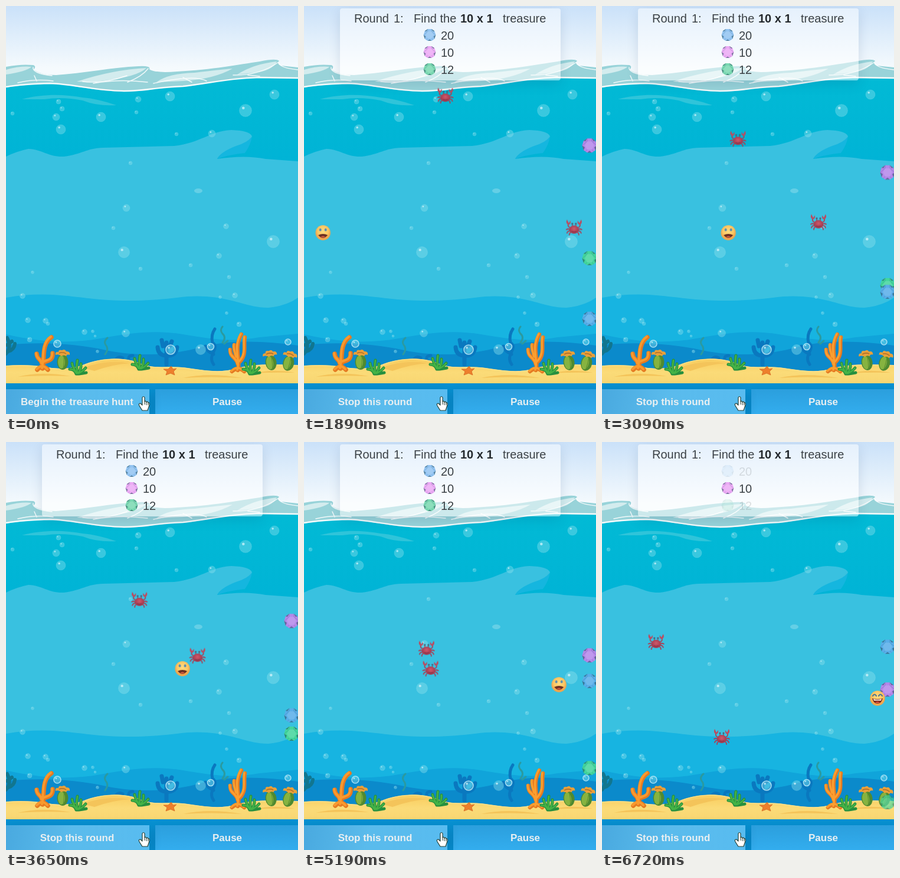
Write an HTML page that moves like this. It is 495 px wide and 691 px high and loops after 8 s.

```html
<!DOCTYPE html>
<html lang="en">
<head>
<meta charset="utf-8">
<title>Treasure hunt</title>
<style>
  html, body { margin: 0; width: 100%; height: 100%; overflow: hidden; }
  body { position: relative; background: #0791d2; font-family: "Liberation Sans", Arial, sans-serif; }
  svg { position: absolute; left: 0; top: 0; }
  .button {
    position: absolute; top: 649px; height: 42px; box-sizing: border-box;
    font: bold 17px/43px "Liberation Sans", Arial, sans-serif; color: #e9eff1; text-align: center;
  }
  #round { left: 0; width: 243px; padding-right: 2px; background: linear-gradient(100deg, #49a9df, #5abbec 45%, #58bcf0);
    box-shadow: 0 6px 20px rgba(0, 40, 80, .24); }
  #pause { left: 253px; width: 242px; padding-left: 2px; background: linear-gradient(#2b9fdd, #33adee);
    box-shadow: 0 4px 16px rgba(0, 40, 80, .16); }
  #round span { position: absolute; left: 0; right: 2px; }
  #panel { position: absolute; left: 61px; top: 4px; width: 374px; height: 122px; border-radius: 4px;
    background: rgba(255, 255, 255, .5); box-shadow: 0 6px 20px rgba(0, 50, 90, .13); }

  .anim, .show, .fade { animation: 8s linear infinite; }
  .show { animation-name: show; }
  .begin { animation: begin 8s step-end infinite; }
  .stop { animation: stop 8s step-end infinite; }
  .fade { animation-name: dim; }
  .gem { animation-name: drift; --d: 1; }
  .rise { --d: -1; }
  #crabA { animation-name: crabA; }
  #crabB { animation-name: crabB; }
  #face { animation-name: face; }
  #faceFade { animation: 8s linear infinite faceIn; }
  .calm { animation: calm 8s step-end infinite; }
  .happy { animation: happy 8s step-end infinite; }
  .pale { animation: pale 8s linear infinite; }

  @keyframes begin { 0% { opacity: 1 } 6.625%, 100% { opacity: 0 } }
  @keyframes stop { 0% { opacity: 0 } 6.625%, 100% { opacity: 1 } }
  @keyframes show { 0%, 8.8% { opacity: 0 } 11.3%, 100% { opacity: 1 } }
  @keyframes faceIn { 0%, 8.8% { opacity: 0 } 13.3%, 100% { opacity: 1 } }
  @keyframes dim { 0%, 82.3% { opacity: 1 } 84%, 100% { opacity: .16 } }
  @keyframes pale { 0%, 82.3% { opacity: 1 } 84%, 100% { opacity: .7 } }
  @keyframes calm { 0% { opacity: 1 } 83.2%, 100% { opacity: 0 } }
  @keyframes happy { 0% { opacity: 0 } 83.2%, 100% { opacity: 1 } }

  /* Everything stalls briefly between 53.6% and 55.5%, then catches up. */
  @keyframes drift {
    0%, 9.125% { transform: translateY(0) }
    53.625% { transform: translateY(calc(var(--d) * 135px)); animation-timing-function: step-end }
    55.5% { transform: translateY(calc(var(--d) * 140.6px)) }
    84%, 100% { transform: translateY(calc(var(--d) * 227px)) }
  }
  @keyframes crabA {
    0%, 9.125% { transform: translate(248.4px, 237.6px) }
    25.1% { transform: translate(238.7px, 142.5px) }
    53.625% { transform: translate(221.4px, 315px); animation-timing-function: step-end }
    55.5% { transform: translate(220.3px, 326.3px) }
    84%, 100% { transform: translate(203px, 499px) }
  }
  @keyframes crabB {
    0%, 9.125% { transform: translate(423.4px, 383.4px) }
    19.225% { transform: translate(484.5px, 377.3px) }
    53.625% { transform: translate(276.2px, 356.4px); animation-timing-function: step-end }
    55.5% { transform: translate(264.8px, 355.2px) }
    84%, 100% { transform: translate(91.7px, 338px) }
  }
  @keyframes face {
    0%, 21.975% { transform: translate(12px, 384px) }
    48.1% { transform: translate(329px, 384px) }
    50.325%, 56.4% { transform: translate(329px, 411px) }
    67.75%, 71.25% { transform: translate(467px, 411px) }
    73.14%, 100% { transform: translate(467px, 434px) }
  }
</style>
</head>
<body>
<svg width="495" height="691" viewBox="0 0 495 691">
  <defs>
    <linearGradient id="sky" x2="0" y2="1"><stop stop-color="#cae1f9"/><stop offset=".35" stop-color="#e0eefb"/><stop offset=".7" stop-color="#f5fafd"/></linearGradient>
    <linearGradient id="deep" x2="0" y2="1"><stop stop-color="#02bad5"/><stop offset="1" stop-color="#00b3d6"/></linearGradient>
    <linearGradient id="sand" x2="0" y2="1"><stop stop-color="#f9cb5c"/><stop offset=".55" stop-color="#fbdb78"/><stop offset="1" stop-color="#f8d672"/></linearGradient>
    <radialGradient id="skin" cy=".4"><stop stop-color="#fedc80"/><stop offset=".7" stop-color="#fcc864"/><stop offset="1" stop-color="#f0a64e"/></radialGradient>
    <radialGradient id="shell" cy=".4"><stop stop-color="#cf5a6b"/><stop offset="1" stop-color="#a63a50"/></radialGradient>

    <symbol id="gem" overflow="visible">
      <path d="M-4-12H4L10-8 12.5 0 10 8 4 12H-4L-10 8-12.5 0-10-8Z" fill="currentColor"/>
      <path d="M-4-12L-10-8-7-7ZM4-12L10-8 7-7ZM12.5 0L10 8 8 3ZM-12.5 0L-10 8-8 3ZM-4 12L4 12 0 9Z" fill="#1f4a58" fill-opacity=".55"/>
      <path d="M-4-7H4L8 0 4 7H-4L-8 0Z" fill="#fff" fill-opacity=".14"/>
      <path d="M-4-12L-4-7-12 0M4-12L4-7 12 0M4 7L7 10M-4 7L-7 10" fill="none" stroke="#1f4e66" stroke-opacity=".22"/>
    </symbol>
    <symbol id="crab" overflow="visible">
      <g fill="none" stroke="#ab3f55" stroke-width="1.8" stroke-linecap="round">
        <path id="limbs" d="M-6 1Q-11 0-10-6M-6 4Q-10 2-13 4M-6 6Q-11 6-12 10M-4 8Q-8 9-8 13"/>
        <use href="#limbs" transform="scale(-1 1)"/>
      </g>
      <path id="claw" d="M-12-13Q-15-7-10-4Q-5-5-6-11L-9-7Z" fill="#bd4a5e"/>
      <use href="#claw" transform="scale(-1 1)"/>
      <path d="M-3-2V-6M3-2V-6" stroke="#8f3a4c" stroke-width="1.2"/>
      <ellipse cy="4" rx="8" ry="7" fill="url(#shell)"/>
      <path d="M-4 7Q0 9 4 7" fill="none" stroke="#803044"/>
      <circle cx="-3" cy="-6" r="1.6" fill="#47627c"/><circle cx="3" cy="-6" r="1.6" fill="#47627c"/>
    </symbol>
    <symbol id="bush" overflow="visible">
      <g fill="none" stroke-linecap="round">
        <path d="M-2 3Q-5-5-13-5M-1 3Q-8-8-9-15M0 3Q-2-8 0-20M1 3Q7-5 6-14M2 3Q9-1 14-7M3 3Q10 2 15 1" stroke="#27903f" stroke-width="5"/>
        <path d="M-2 2Q-5-5-13-5M-1 2Q-8-8-9-15M0 2Q-2-8 0-20M1 2Q7-5 6-14M2 2Q9-1 14-7" stroke="#45b346" stroke-width="2.5"/>
      </g>
    </symbol>
    <symbol id="pod" overflow="visible">
      <ellipse cy="1" rx="9.5" ry="13" fill="#4f8a30"/>
      <ellipse cx="-2" cy="1" rx="6" ry="11" fill="#86b340"/>
      <path d="M2-11Q3 1 1 13" fill="none" stroke="#5c8d30"/>
      <path d="M-12-11Q-13-17-7-16Q-7-21-1-19Q4-22 6-17Q13-18 12-11Q7-13 6-9Q2-12-2-9Q-7-13-12-11Z" fill="#e9a03a"/>
      <path d="M-6-14Q0-17 6-13" fill="none" stroke="#b0702a" stroke-width="1.5"/>
    </symbol>
    <path id="fork" d="M0 0C4-14-3-41 15-53M1-10C9-14 18-13 17-26M-1-8C-3-18-9-14-10-25M-9 2Q0-8 9 2"/>
    <path id="loop" d="M0 0C6-17-8-36 6-61M3-14C16-27 9-42 12-56M0-10C-2-23-13-20-13-35M-2-22C-4-30-7-36-6-43M-10 2Q0-8 11 2"/>
  </defs>

  <rect width="495" height="150" fill="url(#sky)"/>
  <path d="M0 103Q25 98 46 100Q52 102 47 108Q60 117 85 117C130 114 180 104 225 102Q246 101 243 107Q252 114 290 111C350 108 395 99 430 94Q458 88 463 93Q459 98 466 101L495 104V150H0Z" fill="#98d3d9"/>
  <g fill="#d3ecee">
    <path d="M0 108Q25 101 43 103Q35 111 0 116Z"/>
    <path d="M120 128Q180 108 238 105Q222 120 168 126Q145 130 120 128Z"/>
    <path d="M255 129Q275 114 320 113Q360 108 384 106Q352 124 300 127Z"/>
    <path d="M392 116Q420 98 459 94Q452 110 420 113Z"/>
  </g>
  <path d="M46 104Q44 114 78 118M20 130Q50 123 80 127M48 118L52 127M130 128Q165 132 205 118M148 131Q192 123 240 129M241 106Q230 120 206 129M250 131Q320 116 340 127M300 121L315 129M385 117Q430 118 462 95M410 117L430 119M462 97Q466 105 495 108" fill="none" stroke="#fff" stroke-opacity=".85" stroke-width="1.5" stroke-linecap="round"/>
  <path d="M0 138Q30 133 75 132C115 133 145 144 200 145C240 145 255 138 300 137C345 132 380 122 430 122L495 123V270H0Z" fill="url(#deep)"/>
  <path d="M0 137Q30 132 75 131C115 132 145 143 200 144C240 144 255 137 300 136C345 131 380 122 430 121L495 122" fill="none" stroke="#fff" stroke-opacity=".9" stroke-width="2.4"/>
  <path d="M27 158C65 148 100 150 130 155Q155 157 187 168Q155 170 130 160Q95 153 65 158Z" fill="#2fc4da"/>
  <path d="M0 255Q18 246 38 242C62 243 72 256 98 255C130 251 135 241 165 240L285 237C330 232 345 212 382 210Q414 211 417 221Q413 232 390 240Q364 247 358 259Q405 252 440 259L495 263V520H0Z" fill="#39c1e0"/>
  <path d="M358 259Q364 247 390 237Q410 231 417 221Q415 235 405 249Q376 252 358 259Z" fill="#15b6df"/>
  <path d="M0 494Q40 487 80 489C135 493 160 500 220 499S300 489 340 492C390 496 410 511 445 511Q475 508 495 494V620H0Z" fill="#17b4e1"/>
  <path d="M0 556C60 570 110 572 160 563S250 548 300 556S380 570 430 561L495 555V620H0Z" fill="#10a4da"/>
  <path d="M0 574C60 568 120 572 170 583S280 592 330 578S440 568 495 575V625H0Z" fill="#0b8acb"/>

  <g fill="none" stroke="#0a78bf" stroke-linecap="round" stroke-width="7">
    <path d="M272 607V570M270 592Q258 591 257 578M275 592Q288 592 290 578M266 576L264 566M278 576L281 568"/>
    <path d="M352 607C340 590 364 580 350 570Q347 557 354 547M352 590Q340 585 338 576" stroke-width="5"/>
  </g>
  <g fill="none" stroke="#11768f" stroke-linecap="round">
    <path d="M0 589Q10 578 2 562M4 585Q14 582 15 572M2 574L10 568" stroke-width="6"/>
    <path d="M168 590Q175 580 169 574Q165 568 172 562M367 570Q374 561 367 555Q362 549 367 543M370 572L376 567" stroke="#2a9aa0" stroke-width="3"/>
    <path d="M185 600Q190 592 198 596M210 604Q204 592 215 592" stroke="#0a78bf" stroke-width="5"/>
  </g>

  <path d="M0 609Q35 606 65 611Q100 618 130 608C160 595 200 594 225 604C250 616 275 609 300 612S360 623 390 614S455 607 495 608V639H0Z" fill="url(#sand)"/>
  <path d="M0 610Q35 607 65 612Q100 619 130 609C160 596 200 595 225 605C250 617 275 610 300 613S360 624 390 615S455 608 495 609" fill="none" stroke="#fde08a" stroke-width="1.5"/>
  <path d="M130 613Q170 598 210 605Q180 607 150 618ZM20 628Q60 618 110 627Q60 625 20 628ZM300 630Q345 620 400 630Q345 627 300 630ZM420 622Q455 614 490 621Q455 620 420 622Z" fill="#f4c45a"/>

  <g fill="none" stroke-linecap="round">
    <g transform="translate(62 614)">
      <use href="#fork" stroke="#e57a22" stroke-width="7.5"/><use href="#fork" x="-1" y="-1" stroke="#f99a2e" stroke-width="4"/>
    </g>
    <g transform="translate(393 617)">
      <use href="#loop" stroke="#e57a22" stroke-width="6.5"/><use href="#loop" x="-1" y="-1" stroke="#fb9f30" stroke-width="3.5"/>
    </g>
  </g>
  <use href="#pod" x="96" y="602"/>
  <use href="#pod" x="449" y="603" transform="rotate(-8 449 603)"/>
  <use href="#pod" x="479" y="604" transform="rotate(12 479 604)"/>
  <use href="#bush" x="121" y="620"/><use href="#bush" x="227" y="612"/><use href="#bush" x="415" y="620"/>
  <path d="M280 610L283 615 289 614 284 619 286 625 279 622 271 625 273 619 267 615 275 615Z" fill="#ed7f2c" stroke="#d56a24" stroke-width=".8"/>

  <g id="bubbles"></g>
  <ellipse cx="326" cy="313" rx="7" ry="4" fill="#a5e3f0" fill-opacity=".4"/>

  <g class="show">
    <g class="anim gem"><use class="pale" href="#gem" x="484" y="383.2" color="#43d69c"/></g>
    <g class="anim gem rise"><use href="#gem" x="484" y="573.8" color="#58aee9"/></g>
    <g class="anim gem"><use href="#gem" x="484" y="192.2" color="#b587ea"/></g>
    <g class="anim" id="crabA"><use href="#crab"/></g>
    <g class="anim" id="crabB"><use href="#crab"/></g>
  </g>
  <g id="faceFade">
    <g class="anim" id="face">
      <circle r="12.7" fill="url(#skin)"/>
      <g class="calm">
        <ellipse cx="-4.5" cy="-5" rx="2" ry="2.6" fill="#5f8fae"/><ellipse cx="4.5" cy="-5" rx="2" ry="2.6" fill="#5f8fae"/>
        <path d="M-8 4Q0 0 8 4Q4 9 0 9T-8 4Z" fill="#6d3022"/><path d="M-4 7Q0 4 4 7Q0 10-4 7Z" fill="#cf5a40"/>
      </g>
      <g class="happy">
        <path d="M-8-4Q-5-9-2-4M2-4Q5-9 8-4" fill="none" stroke="#4f7690" stroke-width="2.2" stroke-linecap="round"/>
        <path d="M-9 0Q0 3 9 0Q7 9 0 9T-9 0Z" fill="#7a2a20"/><path d="M-7 1Q0 4 7 1L6 4H-6Z" fill="#fff4e4"/><path d="M-4 7Q0 4 4 7Q0 9-4 7Z" fill="#e2523f"/>
      </g>
    </g>
  </g>
</svg>

<div class="show" id="panel"></div>
<div class="button" id="pause">Pause</div>
<div class="button" id="round"><span class="begin">Begin the treasure hunt</span><span class="stop">Stop this round</span></div>
<svg width="495" height="691" viewBox="0 0 495 691">
  <g class="show" font-size="20" fill="#3a4044">
    <text y="28"><tspan x="85">Round</tspan><tspan x="152">1:</tspan><tspan x="186">Find the</tspan><tspan x="265" font-weight="bold" fill="#23282c">10 x 1</tspan><tspan x="337">treasure</tspan></text>
    <g class="fade"><use href="#gem" color="#93c4f2" transform="translate(213 49) scale(.83)"/><text x="232" y="57">20</text></g>
    <use href="#gem" color="#ecaaf5" transform="translate(213 78) scale(.83)"/><text x="232" y="86">10</text>
    <g class="fade"><use href="#gem" color="#7bd9b2" transform="translate(213 107) scale(.83)"/><text x="232" y="115">12</text></g>
  </g>
  <path d="M231 663Q233 660 235 663V670Q237 668 238 671Q241 669 241 672Q244 671 243 676L240 685H231L226 677Q224 673 228 673L231 676Z" fill="#fff" stroke="#253f33" stroke-width="1.2" stroke-linejoin="round"/>
  <path d="M235 670V675M238 671V676M241 672V676" stroke="#253f33"/>
</svg>

<script>
  // x, y, radius; a negative radius marks an outlined bubble.
  const spots = `89 162 4,95 174 4,85 188 6,93 209 8,11 182 3,161 188 8,224 158 5,221 180 3,278 153 8,289 217 3,
    349 216 6,406 177 10.5,455 150 8,211 266 3,204 342 6,182 376 3,200 417 9.5,228 445 3,373 373 4.5,453 399 10.5,
    361 423 4.5,313 439 3,378 459 3,388 490 4.5,363 493 2.5,374 520 2.5,45 451 2.5,28 491 4.5,37 532 4.5,67 533 4.5,
    71 538 3,133 552 4.5,147 551 2.5,151 559 2,203 554 6.5,40 565 4,395 539 4,155 585 2.5,330 582 8.5,
    87 572 -6,279 582 -8,347 577 -5.5,478 569 -5`;
  document.getElementById("bubbles").innerHTML = spots.split(",").map(spot => {
    const [x, y, size] = spot.trim().split(" ").map(Number), r = Math.abs(size);
    const rim = size < 0 ? 'stroke="#b9e8f8" stroke-opacity=".85" stroke-width="1.6"' : 'stroke="#9be4f0" stroke-opacity=".2"';
    return `<circle cx="${x}" cy="${y}" r="${r}" fill="#8fe0ee" fill-opacity=".4" ${rim}/>` +
      `<circle cx="${x - r * .35}" cy="${y - r * .4}" r="${r * .22}" fill="#e8fbff" fill-opacity=".65"/>`;
  }).join("");
</script>
</body>
</html>
```
